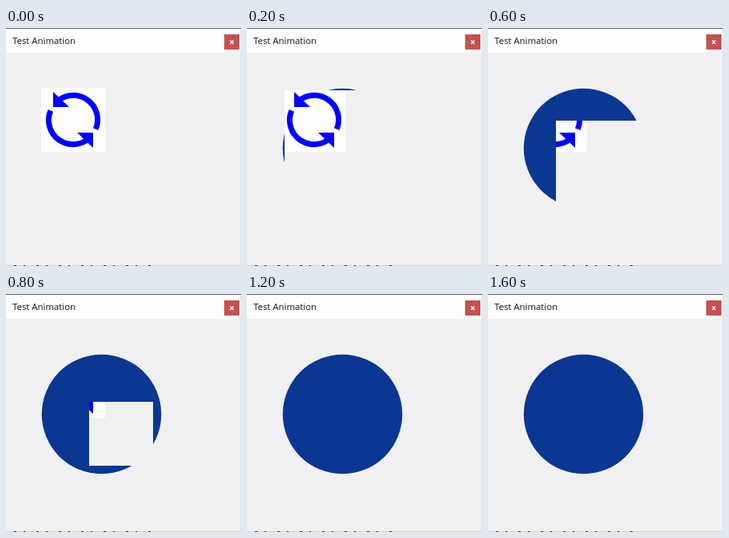
An HTML page that plays this animation: 294 px wide and 298 px high, repeating every 1.8 s.

```html
<!DOCTYPE html>
<html>
<head>
<meta charset="utf-8">
<style>
  html, body { margin: 0; width: 100%; height: 100%; overflow: hidden; background: #f0f0f3; }
  svg { display: block; }
  text { font-family: "Open Sans", "Noto Sans", sans-serif; }
</style>
</head>
<body>
<svg width="294" height="298" viewBox="0 0 294 298">
  <defs>
    <clipPath id="clip"><rect id="hole"/></clipPath>
    <g id="arrow">
      <path d="M-21.6 -21.6A30.5 30.5 0 0 1 28.2 11.7" fill="none" stroke="#00f" stroke-width="7"/>
      <path d="M-25 -35V-16H-5Z" fill="#00f"/>
    </g>
  </defs>

  <!-- window -->
  <rect width="294" height="298" fill="#f0f0f3"/>
  <rect width="293" height="31" fill="#fefefe"/>
  <path d="M0 .5H294" stroke="#666"/>
  <path d="M293.5 1V298" stroke="#e4e4e8"/>
  <path d="M0 297.5H294" stroke="#d4d4d8"/>
  <path d="M10 297.5H190" stroke="#333" stroke-dasharray="3 9 2 14"/>
  <text x="8" y="20" font-size="11.4" fill="#111">Test Animation</text>
  <rect x="273" y="8" width="19" height="19" fill="#c75050"/>
  <path d="M280.5 15.5L284.5 20M284.5 15.5L280.5 20" stroke="#fff" stroke-width="1.5"/>

  <!-- new picture, with the old one inside the shrinking box -->
  <circle cx="119.5" cy="150.5" r="74.8" fill="#0a3792"/>
  <g clip-path="url(#clip)">
    <rect x="44" y="75" width="200" height="200" fill="#f0f0f2"/>
    <rect x="44" y="75" width="80" height="80" fill="#fefefe"/>
    <use href="#arrow" transform="translate(84 115)"/>
    <use href="#arrow" transform="translate(84 115) rotate(180)"/>
  </g>
</svg>
<script>
  const LOOP = 1800, STEP = 200, CX = 144, CY = 175;
  const halfSizes = [100, 97, 78, 59, 40, 19];
  const hole = document.getElementById("hole");

  function draw(now) {
    const half = halfSizes[Math.floor(now % LOOP / STEP)] || 0;
    hole.setAttribute("x", CX - half);
    hole.setAttribute("y", CY - half);
    hole.setAttribute("width", 2 * half);
    hole.setAttribute("height", 2 * half);
  }

  const start = performance.now();
  function tick() {
    draw(performance.now() - start);
    requestAnimationFrame(tick);
  }
  tick();
</script>
</body>
</html>
```
